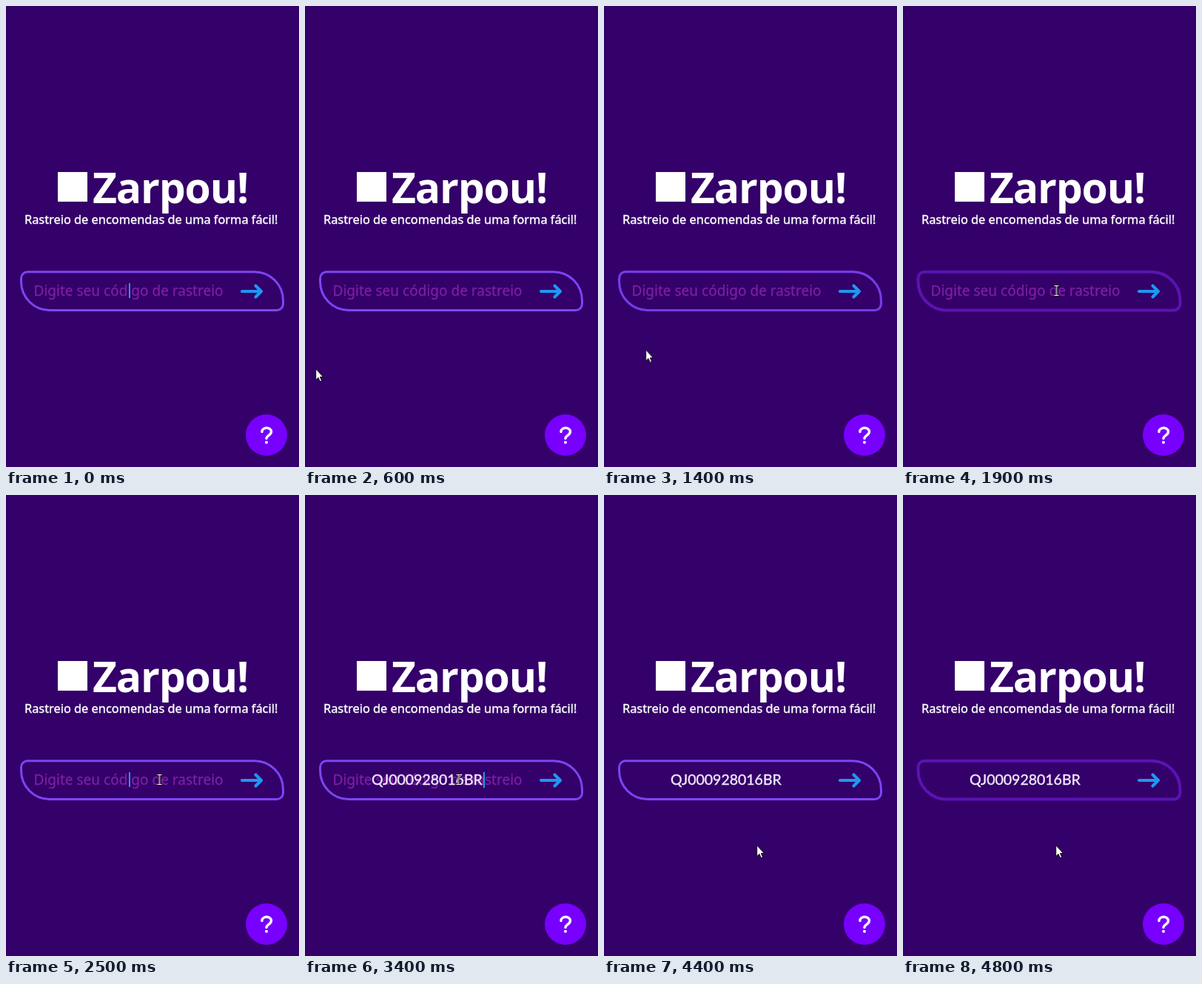
Animation, 396 px wide and 622 px high, one loop 5000 ms. Source, as an HTML page:

```html
<!DOCTYPE html>
<html lang="pt-BR">
<head>
<meta charset="utf-8">
<title>Zarpou!</title>
<style>
  :root { --bright: #7c45f5; --dark: #5a13b3; --blue: #2196f3; }
  html, body { margin: 0; width: 100%; height: 100%; overflow: hidden; background: #340069; }
  svg { display: block; width: 396px; height: 622px; font-family: "Noto Sans", "Open Sans", sans-serif; }
  .title { font-weight: 700; font-size: 57px; letter-spacing: -1.2px; }
  .tagline { font-size: 16.35px; stroke: #fff; stroke-width: .4; }
  .hint { font-size: 19.04px; fill: #7b1fa2; stroke: #7b1fa2; stroke-width: .3; animation: hint 5s infinite; }
  .code { font-family: Lato, "Noto Sans", sans-serif; font-size: 19.5px; fill: #f3e9ff; stroke: #f3e9ff; stroke-width: .4; }
  .line { fill: none; stroke-linecap: round; stroke-linejoin: round; }
  .field { animation: field 5s linear infinite; }
  .go { stroke: var(--blue); stroke-width: 4.2; }
  .help { stroke: #fff; stroke-width: 3.4; }
  .caret { fill: var(--blue); }

  .toggle { animation: 5s step-end infinite; }
  .blink { animation-name: blink; }
  .typed { animation-name: typed; }
  .typed-caret { animation-name: typed-caret; }
  .arrow { animation-name: arrow; }
  .beam { animation-name: beam; }
  .pointer { animation: move 5s step-end infinite; }

  /* 2% of the loop is one 100 ms step */
  @keyframes field {
    0%, 26% { stroke: var(--bright); stroke-width: 3; }
    36%, 42% { stroke: var(--dark); stroke-width: 4; }
    50%, 88% { stroke: var(--bright); stroke-width: 3; }
    96%, 100% { stroke: var(--dark); stroke-width: 4; }
  }
  @keyframes hint {
    0% { opacity: 1; animation-timing-function: step-end; }
    68% { opacity: 1; animation-timing-function: steps(2); }
    72%, 100% { opacity: 0; }
  }
  @keyframes blink {
    0%, 20%, 48% { opacity: 1; }
    10%, 28%, 58%, 100% { opacity: 0; }
  }
  @keyframes typed {
    0% { opacity: 0; }
    68%, 100% { opacity: 1; }
  }
  @keyframes typed-caret {
    0%, 78%, 100% { opacity: 0; }
    68% { opacity: 1; }
  }
  @keyframes arrow {
    0%, 34% { opacity: 0; }
    12%, 82%, 100% { opacity: 1; }
  }
  @keyframes beam {
    0%, 82%, 100% { opacity: 0; }
    34% { opacity: 1; }
  }
  @keyframes move {
    0%, 12% { transform: translate(14px, 489px); }
    12% { animation-timing-function: steps(2); }
    16% { transform: translate(6px, 481px); animation-timing-function: steps(2); }
    20% { transform: translate(10px, 479px); animation-timing-function: steps(2); }
    24% { transform: translate(18px, 483px); }
    26% { transform: translate(18px, 483px); animation-timing-function: steps(5); }
    36% { transform: translate(207.5px, 384px); }
    80% { transform: translate(207.5px, 384px); animation-timing-function: steps(3); }
    86%, 100% { transform: translate(206px, 472px); }
  }
</style>
</head>
<body>
<svg viewBox="0 0 396 622" fill="#fff">
  <rect x="70" y="224" width="40" height="40"/>
  <text class="title" x="117" y="266">Zarpou!</text>
  <text class="tagline" x="25" y="294">Rastreio de encomendas de uma forma fácil!</text>

  <path class="line field" d="M29 358.7H336A38.5 38.5 0 0 1 374.5 397.2V402A8.5 8.5 0 0 1 366 410.5H59A38.5 38.5 0 0 1 20.5 372V367.2A8.5 8.5 0 0 1 29 358.7Z"/>
  <text class="hint" x="37.5" y="391">Digite seu código de rastreio</text>
  <text class="code toggle typed" x="90" y="391">QJ000928016BR</text>
  <rect class="caret toggle blink" x="166" y="374" width="2" height="20"/>
  <rect class="caret toggle typed-caret" x="241" y="374" width="2" height="21"/>
  <path class="line go" d="M319 385H345M337.5 377.5L345 385L337.5 392.5"/>

  <circle cx="352" cy="580" r="28.5" fill="#000" opacity=".1"/>
  <circle cx="352" cy="579" r="28" fill="#7700ff"/>
  <path class="line help" d="M346 574.5C346 567.5 358.5 567.5 358.5 574.5C358.5 579 352 579.5 352 583.5"/>
  <circle cx="352" cy="588.7" r="2"/>

  <g class="pointer">
    <path class="toggle arrow" d="M.7 .8V15.5L4 12.4L6.3 17.6L8.6 16.6L6.4 11.5H10.6Z" stroke="#111" stroke-width="1"/>
    <g class="toggle beam" fill="none">
      <path d="M-3 -6.5H3M0 -6.5V6.5M-3 6.5H3" stroke="#111" stroke-width="3"/>
      <path d="M-3 -6.5H3M0 -6.5V6.5M-3 6.5H3" stroke="#fff" stroke-width="1.1"/>
    </g>
  </g>
</svg>
</body>
</html>
```
